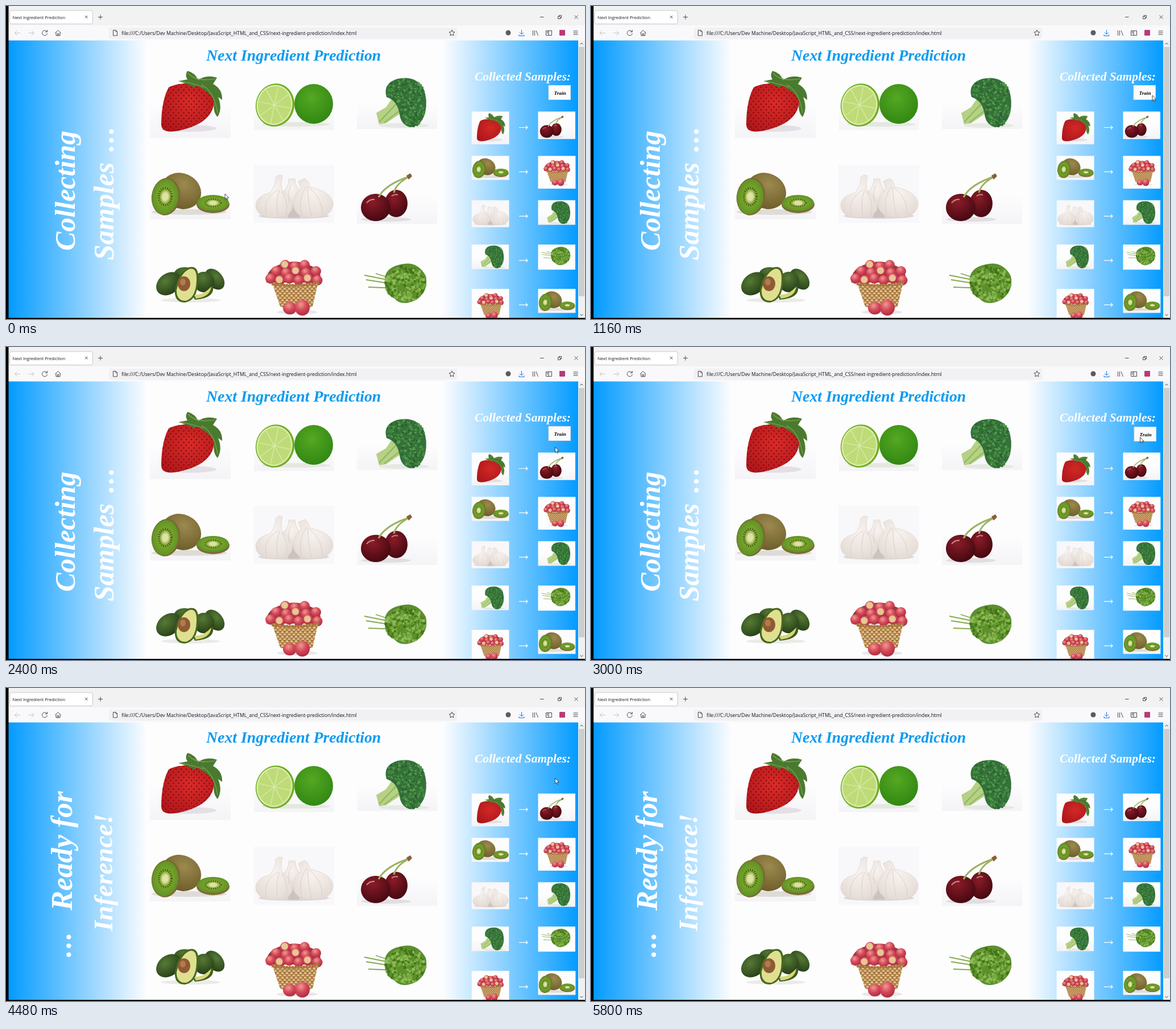
Recreate the animation shown at these times as an HTML page. Size 1018x550 px, loop 5840 ms.

```html
<!DOCTYPE html>
<html lang="en">
<head>
<meta charset="utf-8">
<title>Next Ingredient Prediction</title>
<style>
html, body { margin: 0; width: 100%; height: 100%; overflow: hidden; background: #000; }
svg { display: block; }
.ui { font-family: "Open Sans", "Noto Sans", sans-serif; fill: #15141a; }
.script { font-family: "Brush Script MT", "Liberation Serif", serif; font-style: italic; font-weight: bold; }
.big { font-size: 50px; fill: #fff; }
.line { fill: none; stroke: #4a4a50; stroke-width: 1; }
</style>
</head>
<body>
<svg id="stage" width="1018" height="550" viewBox="0 0 1018 550">
<defs>
  <linearGradient id="left"><stop stop-color="#039bff"/><stop offset="1" stop-color="#fdfdff"/></linearGradient>
  <linearGradient id="right"><stop stop-color="#fdfdff"/><stop offset="1" stop-color="#039bff"/></linearGradient>
  <linearGradient id="paper" x2="0" y2="1"><stop offset=".5" stop-color="#fdfdfe"/><stop offset="1" stop-color="#f4f3f6"/></linearGradient>
  <radialGradient id="berry" cx=".55" cy=".4" r=".7"><stop stop-color="#d92b28"/><stop offset="1" stop-color="#b0161a"/></radialGradient>
  <radialGradient id="lime" cx=".45" cy=".35" r=".7"><stop stop-color="#55a822"/><stop offset="1" stop-color="#2f8512"/></radialGradient>
  <radialGradient id="husk" cx=".5" cy=".3" r=".7"><stop stop-color="#9c8a4e"/><stop offset="1" stop-color="#6d5d2a"/></radialGradient>
  <radialGradient id="flesh"><stop offset=".2" stop-color="#dfe2a4"/><stop offset=".42" stop-color="#7da52e"/><stop offset="1" stop-color="#5f9424"/></radialGradient>
  <radialGradient id="clove" cx=".5" cy=".35" r=".75"><stop stop-color="#f8f3ef"/><stop offset="1" stop-color="#e2d8d2"/></radialGradient>
  <radialGradient id="cherryRed" cx=".4" cy=".3" r=".75"><stop stop-color="#8a1c28"/><stop offset="1" stop-color="#42070f"/></radialGradient>
  <radialGradient id="skin" cx=".45" cy=".3" r=".75"><stop stop-color="#567a36"/><stop offset="1" stop-color="#223a14"/></radialGradient>
  <radialGradient id="apple" cx=".4" cy=".3" r=".75"><stop stop-color="#ee9a90"/><stop offset=".5" stop-color="#d5485a"/><stop offset="1" stop-color="#a52a3c"/></radialGradient>
  <pattern id="seeds" width="9" height="10" patternUnits="userSpaceOnUse">
    <g fill="#7d0b12"><circle cx="2" cy="2.5" r="1.2"/><circle cx="6.5" cy="7.5" r="1.2"/></g>
  </pattern>
  <pattern id="weave" width="8" height="8" patternUnits="userSpaceOnUse">
    <rect width="8" height="8" fill="#b98a50"/>
    <path d="M0 1h4M4 5h4" stroke="#e6c896" stroke-width="2.4"/><path d="M0 4h4M4 0h4" stroke="#7d5629"/>
  </pattern>
  <path id="berryShape" d="M286 143C305 132 350 134 362 148C370 162 366 180 357 192C346 206 326 214 304 219C288 222 274 222 273 209C273 190 275 163 286 143Z"/>

  <g id="strawberry">
    <rect x="253" y="108" width="142" height="124" fill="url(#paper)"/>
    <ellipse cx="322" cy="215" rx="48" ry="6" fill="#e3dfe4"/>
    <use href="#berryShape" fill="url(#berry)"/>
    <use href="#berryShape" fill="url(#seeds)"/>
    <path d="M303 132L319 129Q314 122 319 114Q332 117 338 130Q352 120 371 126L364 137Q381 146 380 165L373 160Q381 180 372 195Q363 186 366 168Q360 154 350 149L338 140L330 143Q318 136 303 132Z" fill="#4a7a2f"/>
    <path d="M320 118Q334 134 368 128M344 138Q366 150 372 188M306 132Q330 136 348 143" fill="none" stroke="#7fa651" stroke-width="1.2"/>
  </g>

  <g id="limes">
    <rect x="436" y="124" width="141" height="94" fill="url(#paper)"/>
    <ellipse cx="510" cy="208" rx="60" ry="4" fill="#e4e8df"/>
    <ellipse cx="541" cy="172" rx="34" ry="35" fill="url(#lime)"/>
    <g transform="rotate(12 473 174)">
      <ellipse cx="473" cy="174" rx="34" ry="38" fill="#6fae25"/>
      <ellipse cx="472" cy="174" rx="31.500" ry="35.500" fill="#dcebab"/>
      <ellipse cx="472" cy="174" rx="29" ry="33" fill="#bedb78"/>
      <path d="M472 142V206M444 174H500M452 151L492 197M492 151L452 197" stroke="#dcebb0" stroke-width="1.2"/>
    </g>
  </g>

  <g id="broccoli">
    <rect x="617" y="123" width="141" height="93" fill="url(#paper)"/>
    <ellipse cx="700" cy="210" rx="44" ry="4" fill="#e6e8e3"/>
    <path d="M651 188L668 178L682 158L708 172L692 190L668 206L656 208Z" fill="#b4d184"/>
    <path d="M656 204L690 168M665 205L697 180" stroke="#90b660" stroke-width="2"/>
    <path d="M669 160Q662 136 688 128Q720 121 734 145Q742 165 737 188Q730 212 710 213Q694 208 692 190Q688 166 669 160Z" fill="#35703a"/>
  </g>

  <g id="kiwi">
    <rect x="253" y="284" width="142" height="91" fill="url(#paper)"/>
    <ellipse cx="322" cy="362" rx="66" ry="5" fill="#dedcd6"/>
    <ellipse cx="308" cy="325" rx="36" ry="31" fill="url(#husk)" transform="rotate(25 308 325)"/>
    <ellipse cx="364" cy="349" rx="29" ry="15" fill="#806a37"/>
    <ellipse cx="364" cy="346" rx="28" ry="14" fill="url(#flesh)"/>
    <ellipse cx="364" cy="346" rx="14" ry="6.500" fill="none" stroke="#3b4a14" stroke-width="2.4" stroke-dasharray="1.2 2.600"/>
    <ellipse cx="281" cy="335" rx="25" ry="33" fill="#7d6633" transform="rotate(8 281 335)"/>
    <ellipse cx="280" cy="335" rx="23" ry="31" fill="url(#flesh)" transform="rotate(8 280 335)"/>
    <ellipse cx="280" cy="335" rx="11" ry="15" fill="none" stroke="#3b4a14" stroke-width="4" stroke-dasharray="1.2 2.600"/>
  </g>

  <g id="garlic">
    <rect x="435" y="279" width="142" height="102" fill="#f8f7f9"/>
    <ellipse cx="506" cy="369" rx="62" ry="5" fill="#dcd7d8"/>
    <path d="M495 372L505 345L517 372Z" fill="#cdc3be"/>
    <g fill="url(#clove)" stroke="#dbd1cb" stroke-width=".7">
      <path d="M497 304H508Q508 317 520 327Q526 350 500 352Q478 346 484 329Q498 318 497 304Z"/>
      <path d="M480 297L486 298Q481 318 488 328Q505 336 504 354Q500 371 471 372Q440 371 439 350Q440 334 464 328Q475 316 474 301Z"/>
      <path d="M514 308L525 303Q532 306 534 318Q572 326 575 346Q575 371 540 372Q506 371 505 349Q506 329 519 322Z"/>
    </g>
    <path d="M478 323Q450 340 458 368M481 323Q473 345 478 370M485 326Q498 345 492 367M528 317Q512 340 520 368M530 317Q531 345 537 371M533 319Q558 340 556 367M501 315Q494 330 498 345" fill="none" stroke="#dbcfcb"/>
  </g>

  <g id="cherries">
    <rect x="617" y="279" width="141" height="104" fill="url(#paper)"/>
    <ellipse cx="668" cy="375" rx="44" ry="4" fill="#e1dee2"/>
    <ellipse cx="686" cy="347" rx="20" ry="24" fill="url(#cherryRed)"/>
    <ellipse cx="650" cy="354" rx="26" ry="24" fill="url(#cherryRed)"/>
    <path d="M655 336Q667 313 711 299M682 328Q686 311 711 299" fill="none" stroke="#9cb163" stroke-width="3"/>
    <path d="M704 298L711 294L714 299L708 305Z" fill="#866038"/>
    <path d="M634 346Q640 339 648 340M678 334Q683 330 689 332" fill="none" stroke="#c9848a" stroke-width="2"/>
  </g>

  <g id="avocados">
    <ellipse cx="325" cy="517" rx="52" ry="4" fill="#eaebe7"/>
    <ellipse cx="314" cy="470" rx="18" ry="11" fill="url(#skin)"/>
    <ellipse cx="367" cy="480" rx="21" ry="14" fill="url(#skin)" transform="rotate(50 367 480)"/>
    <ellipse cx="286" cy="488" rx="24" ry="18" fill="url(#skin)" transform="rotate(-38 286 488)"/>
    <ellipse cx="348" cy="485" rx="18" ry="18" fill="url(#skin)"/>
    <path d="M329 510Q344 512 364 491Q368 514 332 516Z" fill="#405e1d"/>
    <path d="M333 507Q346 509 361 493Q359 512 333 514Z" fill="#d5d779"/>
    <path d="M322 459Q340 455 338 482Q337 517 315 521Q295 521 297 498Q304 465 322 459Z" fill="#48671f"/>
    <path d="M323 462Q336 459 335 482Q334 513 316 518Q299 518 300 499Q307 468 323 462Z" fill="#dfe08f"/>
    <ellipse cx="313" cy="488" rx="11" ry="13" fill="#8f5b34"/>
    <ellipse cx="311" cy="485" rx="5" ry="6" fill="#b07c4e"/>
  </g>

  <g id="basket">
    <rect x="435" y="430" width="142" height="124" fill="#fdfdfe"/>
    <ellipse cx="512" cy="538" rx="36" ry="4" fill="#e9e6e8"/>
    <path d="M458 486Q455 462 485 453Q510 444 535 456Q558 465 552 486Z" fill="#9c3a40"/>
    <g id="apples"></g>
    <path d="M468 487Q510 493 549 485L539 528Q510 538 482 528Z" fill="url(#weave)"/>
    <path d="M467 488Q510 495 551 486" fill="none" stroke="#a8763c" stroke-width="5" stroke-dasharray="4 1"/>
    <ellipse cx="499" cy="531" rx="12" ry="11" fill="url(#apple)"/>
    <ellipse cx="521" cy="530" rx="13" ry="14" fill="url(#apple)"/>
  </g>

  <g id="parsley">
    <rect x="617" y="444" width="141" height="95" fill="#fdfdfe"/>
    <path d="M630 473L690 485M633 481L690 490M637 494L690 496M650 470L690 483" stroke="#86a94f" stroke-width="1.8"/>
    <path d="M666 487Q663 462 690 455Q722 445 738 474Q744 500 722 516Q696 529 683 514Q666 506 666 487Z" fill="#5c8f2f"/>
  </g>
</defs>

<!-- browser frame -->
<rect x="4" width="1014" height="35" fill="#f2f2f3"/>
<rect x="4" y="34" width="1014" height="27" fill="#f9f9fb"/>
<rect x="6.500" y="8" width="146" height="23.500" rx="3" fill="#fff" stroke="#c9c9d0"/>
<rect x="181" y="38" width="612" height="19.500" rx="3" fill="#f1f1f4"/>
<text class="ui" x="11.500" y="22.500" font-size="7.600">Next Ingredient Prediction</text>
<text class="ui" x="203" y="51" font-size="8.700">file:///C:/Users/Dev Machine/Desktop/JavaScript_HTML_and_CSS/next-ingredient-prediction/index.html</text>
<path class="line" style="stroke:#c4c4c8" d="M25 47.500H15.500M19.500 43.500L15.500 47.500L19.500 51.500M39.500 47.500H49M45 43.500L49 47.500L45 51.500"/>
<path class="line" d="M139 17L143.500 21.500M143.500 17L139 21.500M162 19.500H170M166 15.500V23.500M939 19.500H945.500M970.500 18.500H974.500V22.500H970.500ZM972 18V16.500H976.500V21H975M999.500 16.500L1005.500 22.500M1005.500 16.500L999.500 22.500"/>
<path class="line" d="M71.500 44.500A4.500 4.500 0 1 0 72.500 48M72.500 42V45.500H69M86.500 47.500L91.500 42.500L96.500 47.500M88 46.500V52H95V46.500M90.500 52V48.500H92.500V52M188.500 42.500H193L195.500 45V52H188.500ZM193 42.500V45H195.500"/>
<path class="line" d="M784 42L785.500 45.500L789 46L786.300 48.500L787 52L784 50.300L781 52L781.700 48.500L779 46L782.500 45.500Z"/>
<circle cx="883" cy="47" r="4.500" fill="#5b5b62"/>
<path class="line" style="stroke:#1672e6" d="M906.500 42V49.500M903 46.500L906.500 50L910 46.500M902 50V52.500H911V50"/>
<path class="line" d="M926.500 43V52M929.500 43V52M932 43L935.500 52M949.500 43.500H959.500V51.500H949.500ZM954 43.500V51.500M951 45.500H953M951 47.500H953M997.500 44H1005.500M997.500 47H1005.500M997.500 50H1005.500"/>
<rect x="973" y="42" width="10" height="10" rx="1" fill="#b93b78"/>

<!-- page -->
<rect x="4" y="60.500" width="1002" height="488" fill="#fdfdfe"/>
<rect x="4" y="60.500" width="244" height="488" fill="url(#left)"/>
<rect x="767" y="60.500" width="239" height="488" fill="url(#right)"/>
<rect x="1006" y="60.500" width="12" height="488" fill="#f0f0f0"/>
<rect x="1007" y="72" width="10" height="438" fill="#cdcdcd"/>
<path class="line" d="M1009.500 67.500L1012 65L1014.500 67.500M1009.500 541.500L1012 544L1014.500 541.500"/>
<text class="script" x="352" y="96" font-size="27.800" fill="#0a9bf0">Next Ingredient Prediction</text>
<text class="script" x="824" y="131" font-size="21.500" fill="#fff">Collected Samples:</text>
<g id="train">
  <rect x="954" y="139.500" width="38.500" height="25" fill="#fbfbfd" stroke="#d6dbe2"/>
  <text class="script" x="963.500" y="155.500" font-size="9.200">Train</text>
</g>
<g id="collecting" class="script big">
  <text transform="translate(121 430) rotate(-90)">Collecting</text>
  <text transform="translate(189 447) rotate(-90)">Samples</text>
  <text transform="translate(189 256) rotate(-90)" letter-spacing="3">...</text>
</g>
<g id="ready" class="script big">
  <text transform="translate(114 473) rotate(-90)" letter-spacing="3">...</text>
  <text transform="translate(116 391) rotate(-90)" font-size="52">Ready for</text>
  <text transform="translate(187 427) rotate(-90)" font-size="47">Inference!</text>
</g>
<g id="items"></g>
<rect width="4.500" height="550"/>
<rect y="548" width="1018" height="2"/>
<path id="cursor" d="M0 0V9.500L2.200 7.500L3.700 11L5.200 10.300L3.700 7H6.600Z" fill="#fff" stroke="#222" stroke-width=".8"/>
</svg>
<script>
const $ = id => document.getElementById(id);
let seed = 7;
const rnd = () => (seed = seed * 16807 % 2147483647) / 2147483647;
const dot = (x, y, r, fill) => `<circle cx="${x.toFixed(1)}" cy="${y.toFixed(1)}" r="${r.toFixed(1)}" fill="${fill}"/>`;

// fills an ellipse with small leafy dots
function foliage(id, n, cx, cy, rx, ry, r, colors) {
  let s = '';
  for (let i = 0; i < n; i++) {
    const a = rnd() * 2 * Math.PI, d = Math.sqrt(rnd());
    s += dot(cx + rx * d * Math.cos(a), cy + ry * d * Math.sin(a), r * (.6 + rnd() * .5), colors[i % colors.length]);
  }
  $(id).insertAdjacentHTML('beforeend', s);
}
const greens = ['#35753a', '#43883f', '#2b6430', '#559a4e'];
foliage('broccoli', 190, 702, 149, 33, 20, 2.4, greens);
foliage('broccoli', 150, 715, 184, 20, 27, 2.4, greens);
foliage('parsley', 320, 702, 488, 35, 31, 2.7, ['#5c9127', '#79aa40', '#437519', '#8fbb58']);

// rows of apples heaped in the basket, every third one pale: y, count, first x, step
const heap = [[455, 3, 491, 17], [466, 5, 475, 17.5], [479, 6, 465, 16.5]];
$('apples').innerHTML = heap.map(([y, n, x, step], row) =>
  Array.from({ length: n }, (_, i) => {
    const cx = x + i * step, cy = y + i % 2 * 3;
    return dot(cx, cy, 9, 'url(#apple)') + ((i + row) % 3 ? '' : dot(cx - 1, cy - 1, 6, '#e8c695'));
  }).join('')).join('');

// big grid, then collected pairs
const use = (id, t = '') => `<use href="#${id}" transform="${t}"/>`;
const origin = { strawberry: [253, 108], cherries: [617, 279], kiwi: [253, 284], basket: [435, 430],
  garlic: [435, 279], broccoli: [617, 123], parsley: [617, 444] };
const pairs = [['strawberry', 'cherries'], ['kiwi', 'basket'], ['garlic', 'broccoli'], ['broccoli', 'parsley'], ['basket', 'kiwi']];
const thumb = (id, x, y) => use(id, `translate(${x} ${y}) scale(.464) translate(${-origin[id][0]} ${-origin[id][1]})`);
$('items').innerHTML = [...Object.keys(origin), 'limes', 'avocados'].map(id => use(id)).join('') +
  pairs.map(([a, b], i) => {
    const y = 185.5 + i * 77.9;
    return thumb(a, 818.7, y) + thumb(b, 935.5, y) +
      `<path d="M902 ${y + 28}h15m-3 -3l3 3l-3 3" fill="none" stroke="#fff" stroke-width="1.2"/>`;
  }).join('');

// pointer stops: time, x, y
const LOOP = 5840, CLICK = 3120;
const stops = [[0, 385, 330], [60, 385, 330], [500, 976, 179], [640, 976, 179], [900, 987, 157], [1400, 987, 157],
  [1720, 965.5, 182], [2300, 965.5, 182], [2600, 965.5, 158.5], [4950, 965.5, 158.5], [5400, 1022, 150], [LOOP, 1022, 150]];
function pointer(t) {
  const i = stops.findIndex(s => s[0] > t), [t0, x0, y0] = stops[i - 1], [t1, x1, y1] = stops[i];
  const u = (t - t0) / (t1 - t0), k = u * u * (3 - 2 * u);
  return [x0 + (x1 - x0) * k, y0 + (y1 - y0) * k];
}
const show = (id, on) => $(id).setAttribute('visibility', on ? 'visible' : 'hidden');
const start = performance.now();
function draw(now) {
  const t = Math.max(0, now - start) % LOOP, done = t >= CLICK;
  $('cursor').setAttribute('transform', `translate(${pointer(t)})`);
  $('train').setAttribute('transform', t > 2960 && !done ? 'translate(1 1)' : '');
  show('train', !done);
  show('collecting', !done);
  show('ready', done);
  requestAnimationFrame(draw);
}
draw(start);
</script>
</body>
</html>
```
